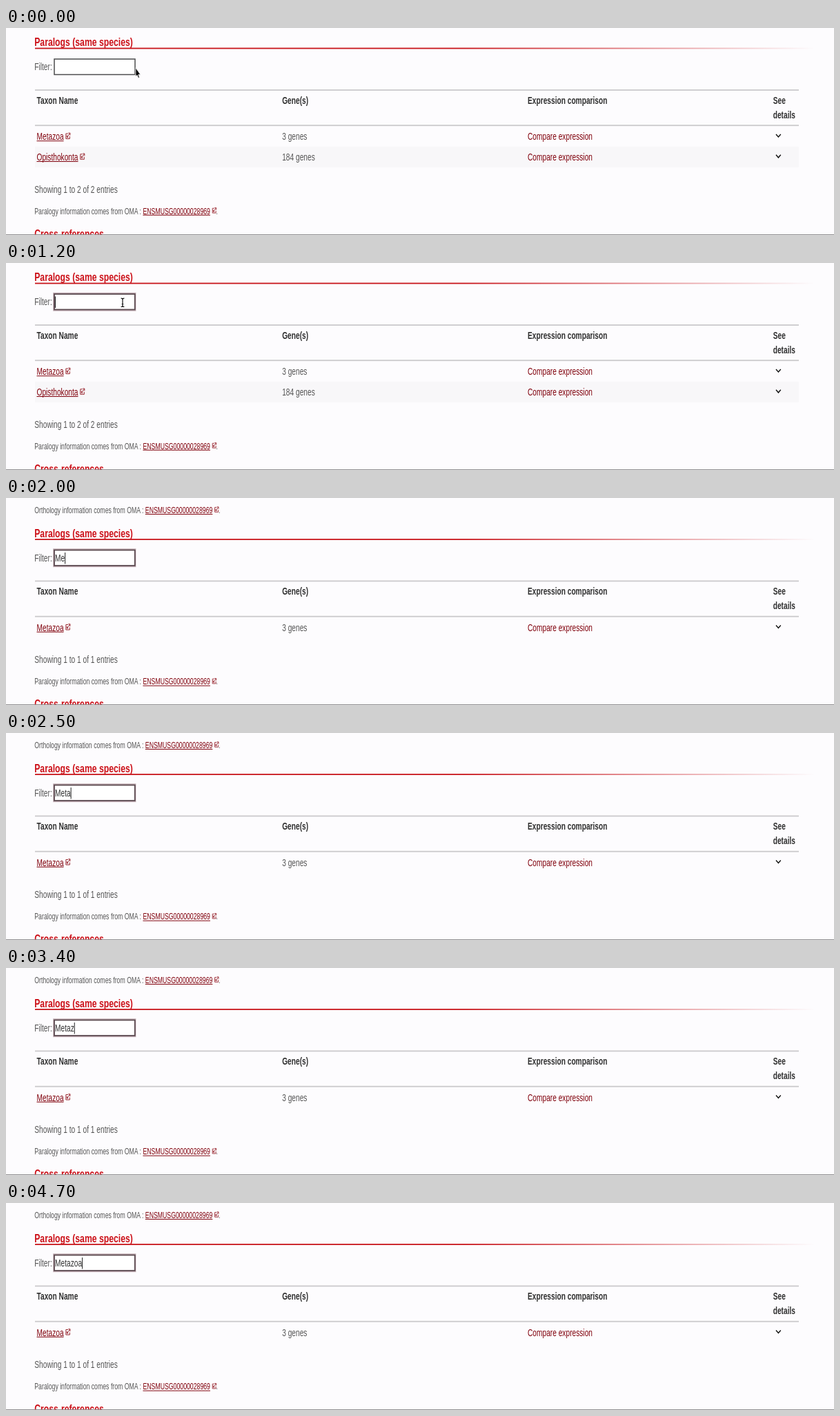
Write an HTML page that moves like this. It is 1200 px wide and 300 px high and loops after 4.8 s.

```html
<!DOCTYPE html>
<html lang="en">
<head>
<meta charset="utf-8">
<title>Paralogs filter</title>
<style>
  html, body { margin: 0; width: 100%; height: 100%; overflow: hidden; background: #fdfcfe; }
  svg { display: block; width: 1200px; height: 300px; }
  text { font: 14px "Liberation Sans", Arial, sans-serif; fill: #555; white-space: pre; }
  .bold { font-weight: bold; fill: #2f2f2f; }
  .title { font-weight: bold; font-size: 16.8px; fill: #cc1018; }
  .small { font-size: 12px; }
  .link { fill: #80000c; }
  .typed { fill: #333; }
  .icon { fill: none; stroke: #9a2a33; stroke-width: 1; }
  .chevron { fill: none; stroke: #111; stroke-width: 1.4; }
  .rule { fill: #cbcacc; }
</style>
</head>
<body>
<svg id="stage" viewBox="0 0 1200 300">
  <defs>
    <linearGradient id="fade">
      <stop offset="0" stop-color="#c8141a"/>
      <stop offset=".55" stop-color="#c8141a"/>
      <stop offset="1" stop-color="#c8141a" stop-opacity="0"/>
    </linearGradient>
  </defs>
</svg>
<script>
const SQUEEZE = 0.728;   // the page is shown narrowed horizontally
const LOOP = 4800, TICK = 100, BLINK = 500;
const SHIFT = 30.5;      // the page moves down when one row is filtered out
const LEFT = 41.3;
const GENE_ID = 'ENSMUSG00000028969';

const stage = document.getElementById('stage');

function add(parent, tag, attrs = {}) {
  const node = document.createElementNS('http://www.w3.org/2000/svg', tag);
  for (const key in attrs) node.setAttribute(key, attrs[key]);
  return parent.appendChild(node);
}
const group = parent => add(parent, 'g');
const rect = (parent, x, y, width, height, attrs) =>
  add(parent, 'rect', { x, y, width, height, ...attrs });
const show = (node, on) => node.setAttribute('visibility', on ? 'visible' : 'hidden');
const move = (node, x, y) => node.setAttribute('transform', `translate(${x} ${y})`);

function label(parent, x, y, content, style = '') {
  const node = add(parent, 'text', {
    class: style, transform: `translate(${x} ${y}) scale(${SQUEEZE} 1)`
  });
  node.textContent = content;
  return node;
}
const widthOf = node => node.getComputedTextLength() * SQUEEZE;

function link(parent, x, y, content, style, iconScale) {
  const node = label(parent, x, y, content, 'link ' + style);
  const width = widthOf(node);
  rect(parent, x, y + 1.2, width, 1, { fill: '#80000c' });
  add(parent, 'path', {
    class: 'icon',
    d: 'M3.5 -8H.5V-.5H6V-4M2.5 -3L6.3 -8.6M4 -8.8H6.5V-5.5M2 -5.5V-2.5H4',
    transform: `translate(${x + width + 2.8} ${y - 1}) scale(${iconScale})`
  });
  return x + width;
}

function omaNote(parent, y, kind) {
  const node = label(parent, LEFT, y, `${kind} information comes from OMA : `, 'small');
  const end = link(parent, LEFT + widthOf(node), y, GENE_ID, 'small', 0.9);
  label(parent, end + 8.6, y, '.', 'small');
}

function tableRow(parent, y, taxon, count) {
  link(parent, 44.5, y, taxon, '', 1);
  label(parent, 400.2, y, `${count} genes`);
  label(parent, 756, y, 'Compare expression', 'link');
  add(parent, 'path', { class: 'chevron', d: `M1116 ${y - 8}l3.4 4l3.4 -4` });
}

// Page
const orthology = group(stage);
omaNote(orthology, 21.8, 'Orthology');

const page = group(stage);
label(page, 41.2, 26, 'Paralogs (same species)', 'title');
rect(page, 42, 28.6, 1130, 1.8, { fill: 'url(#fade)' });
label(page, LEFT, 61.3, 'Filter:');

const plainBox = rect(page, 70, 45, 117, 22.5, { fill: '#fff', stroke: '#4c4c4e', 'stroke-width': 1.5 });
const focusBox = group(page);
rect(focusBox, 69.2, 43.8, 118.2, 24.9, { fill: '#fff', stroke: '#c3aeb5', 'stroke-width': 2 });
rect(focusBox, 70, 45, 116.8, 22.5, { fill: '#fff', stroke: '#5c4b51', 'stroke-width': 1.8 });
const typed = label(page, 71, 61.6, '', 'typed');
const caret = rect(page, 0, 48.5, 1, 16.5, { fill: '#222' });

rect(page, 42, 89, 1107, 1.8, { class: 'rule' });
[[44.5, 'Taxon Name'], [400.2, 'Gene(s)'], [756, 'Expression comparison'], [1111.7, 'See']]
  .forEach(([x, name]) => label(page, x, 109.8, name, 'bold'));
label(page, 1111.7, 130.8, 'details', 'bold');
rect(page, 42, 140.3, 1107, 1.8, { class: 'rule' });

tableRow(page, 162, 'Metazoa', 3);
const otherRow = group(page);
rect(otherRow, 42, 172, 1107, 30, { fill: '#f8f7f9' });
tableRow(otherRow, 191.8, 'Opisthokonta', 184);

const summary = label(stage, LEFT, 239.2, '');
const paralogy = group(stage);
omaNote(paralogy, 269.5, 'Paralogy');
label(stage, 41.2, 304, 'Cross-references', 'title');
rect(stage, 0, 299, 1200, 1, { fill: '#8f8e90' });

// Mouse pointers
const arrow = add(stage, 'path', {
  d: 'M0 0V12.5L2.1 10.4L3.8 14.6L5.4 13.8L3.8 9.8H6.8Z',
  fill: '#000', stroke: '#fff', 'stroke-width': 0.7
});
const beam = add(stage, 'path', {
  d: 'M-2.4 -6.2Q0 -6.2 0 -4.6Q0 -6.2 2.4 -6.2M0 -4.8V4.8M-2.4 6.2Q0 6.2 0 4.6Q0 6.2 2.4 6.2M-1.2 2.2H1.2',
  fill: 'none', stroke: '#111', 'stroke-width': 1.2
});

// Timeline
const FOCUS = 900, FILTERED = 2000;
const keys = [[1800, 'M'], [2000, 'e'], [2200, 't'], [2400, 'a'], [3000, 'z'], [3500, 'o'], [3700, 'a']];
const mouse = [[0, 188], [200, 181], [400, 181], [800, 169]];

function mouseX(t) {
  for (let i = 1; i < mouse.length; i++) {
    const [t0, x0] = mouse[i - 1], [t1, x1] = mouse[i];
    if (t < t1) return x0 + (x1 - x0) * (t - t0) / (t1 - t0);
  }
  return mouse[mouse.length - 1][1];
}

function draw(time) {
  const t = Math.floor(time % LOOP / TICK) * TICK;
  const pressed = keys.filter(([at]) => at <= t);
  const filtered = t >= FILTERED;
  const focused = t >= FOCUS;

  move(page, 0, filtered ? SHIFT : 0);
  move(paralogy, 0, filtered ? 0.9 : 0);
  show(orthology, filtered);
  show(otherRow, !filtered);
  const total = filtered ? 1 : 2;
  summary.textContent = `Showing 1 to ${total} of ${total} entries`;

  show(plainBox, !focused);
  show(focusBox, focused);
  typed.textContent = pressed.map(([, key]) => key).join('');
  const lastAction = pressed.length ? pressed[pressed.length - 1][0] : FOCUS;
  show(caret, focused && Math.floor((t - lastAction) / BLINK) % 2 === 0);
  caret.setAttribute('x', 71 + (pressed.length ? widthOf(typed) : 0));

  const x = mouseX(t), overBox = x < 187;
  move(arrow, x, 57.8);
  move(beam, x, 57.3);
  show(arrow, !overBox);
  show(beam, overBox && !pressed.length);
}

const start = performance.now();
function loop() {
  draw(performance.now() - start);
  requestAnimationFrame(loop);
}
loop();
</script>
</body>
</html>
```
